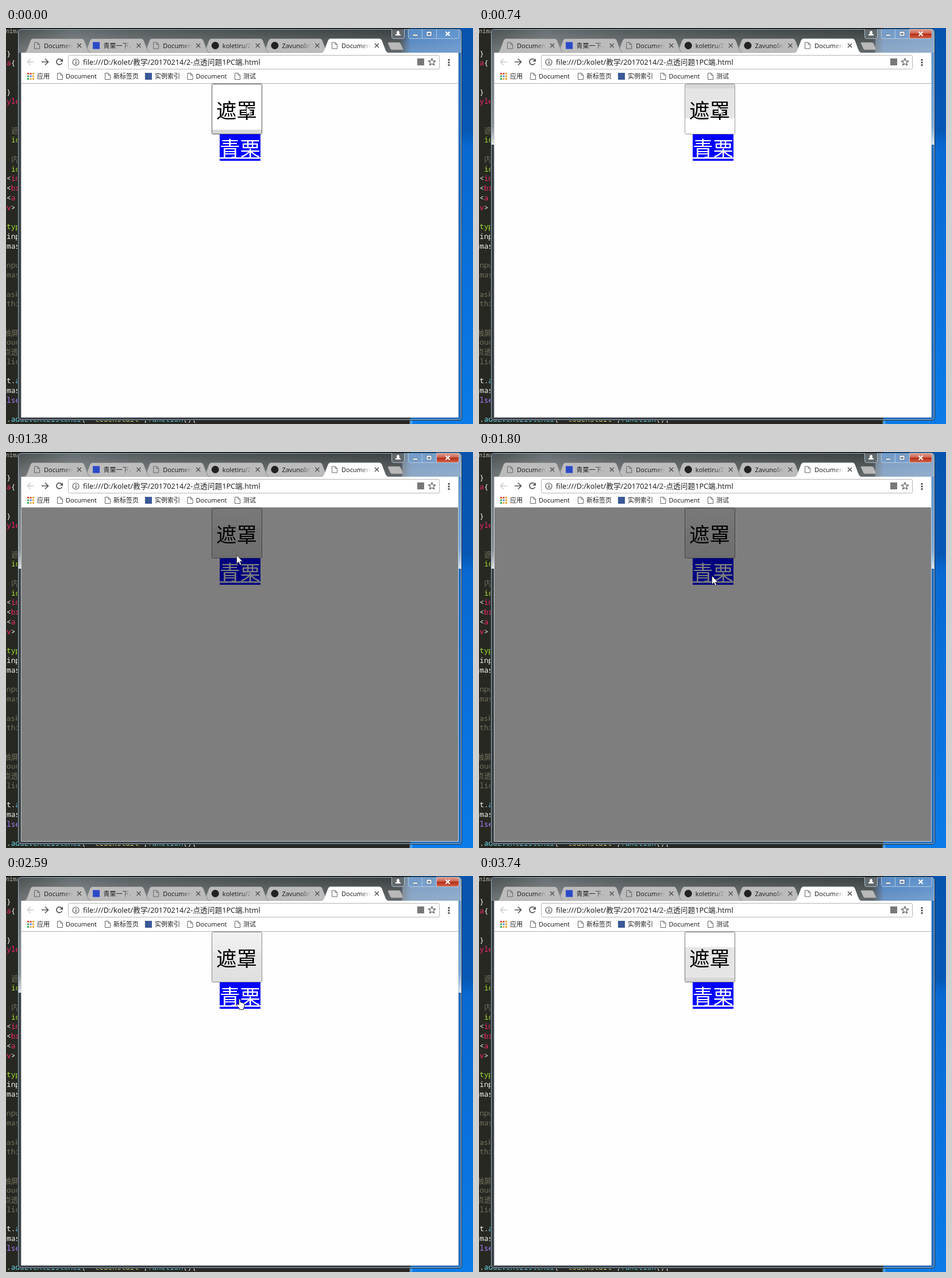
An HTML page for the animation above (3840 ms loop, 813x689 px).

```html
<!DOCTYPE html>
<html lang="zh-CN">
<head>
<meta charset="utf-8">
<style>
  html, body { margin: 0; width: 100%; height: 100%; overflow: hidden; background: #272822; }
  svg { display: block; width: 813px; height: 689px; }
  text { white-space: pre; }
  .ui { font: 11px "Noto Sans", "Noto Sans CJK SC", "Noto Sans CJK", sans-serif; fill: #222; }
  .url { font-size: 12.7px; }
  .big { font: 35.5px "Noto Sans CJK SC", "Noto Sans CJK", sans-serif; }
  .code { font: 12.8px "Noto Sans Mono", "Noto Sans CJK SC", "Noto Sans CJK", monospace; }
  .line { fill: none; stroke: #555; stroke-width: 1.7; }
</style>
</head>
<body>
<svg viewBox="0 0 813 689">
  <defs>
    <linearGradient id="desktop" x2="0" y2="1">
      <stop stop-color="#0754ad"/><stop offset=".26" stop-color="#0758b5"/>
      <stop offset=".3" stop-color="#0869d2"/><stop offset="1" stop-color="#0a7be8"/>
    </linearGradient>
    <linearGradient id="glass">
      <stop stop-color="#3f4547"/><stop offset=".12" stop-color="#5e6568"/><stop offset=".3" stop-color="#4a5053"/>
      <stop offset=".6" stop-color="#3a4042"/><stop offset=".86" stop-color="#2e3336"/>
      <stop offset=".885" stop-color="#3d75b8"/><stop offset="1" stop-color="#4883c5"/>
    </linearGradient>
    <linearGradient id="sheen" x2="0" y2="1">
      <stop stop-color="#fff" stop-opacity=".06"/><stop offset="1" stop-color="#dde4e8" stop-opacity=".3"/>
    </linearGradient>
    <linearGradient id="sideLight" x2="0" y2="1">
      <stop stop-color="#e8f0f6" stop-opacity=".3"/><stop offset=".8" stop-color="#e8f0f6" stop-opacity=".45"/>
      <stop offset="1" stop-color="#fff" stop-opacity=".85"/>
    </linearGradient>
    <linearGradient id="red" x2="0" y2="1">
      <stop stop-color="#e3a396"/><stop offset=".45" stop-color="#cf6350"/>
      <stop offset=".5" stop-color="#b52c16"/><stop offset="1" stop-color="#d2674d"/>
    </linearGradient>
    <linearGradient id="plain" x2="0" y2="1">
      <stop stop-color="#f2f2f2"/><stop offset=".4" stop-color="#ebebeb"/>
      <stop offset=".41" stop-color="#e6e6e6"/><stop offset="1" stop-color="#dfdfdf"/>
    </linearGradient>
    <linearGradient id="fade"><stop stop-color="#bcbcbc" stop-opacity="0"/><stop offset="1" stop-color="#bcbcbc"/></linearGradient>
    <linearGradient id="fadeWhite"><stop stop-color="#fff" stop-opacity="0"/><stop offset="1" stop-color="#fff"/></linearGradient>
    <path id="outline" d="M20.500 8Q20.500 1.500 27 1.500H787Q793.500 1.500 793.500 8V677Q793.500 682.500 788 682.500H26Q20.500 682.500 20.500 677Z"/>
    <path id="page" d="M.5.5H6L9.500 4V11.500H.5ZM6 .5V4H9.500" fill="none" stroke="#666"/>
    <path id="cross" d="M-3.500-3.500 3.500 3.500M3.500-3.500-3.500 3.500" stroke="#555" stroke-width="1.500"/>
  </defs>

  <path d="M0 0H813V689H0Z" fill="#272822"/>
  <path d="M0 0H700V2H0Z" fill="#191b1a"/>
  <path d="M704 0H813V689H704Z" fill="url(#desktop)"/>
  <path d="M703.500 683V689M706.500 683V689" stroke="#9fcdf3"/>
  <g id="editor" class="code"></g>

  <!-- window frame -->
  <use href="#outline" fill="url(#glass)"/>
  <path d="M21 43H27V677H704V682H26Q21 682 21 677Z" fill="#3b4042"/>
  <path d="M788 43H793V682H704V678H788Z" fill="#246dbd"/>
  <path d="M21 3H793V43H21Z" fill="url(#sheen)"/>
  <g id="activeFrame">
    <path d="M690 3H793V43H690Z" fill="#b9c0c6" opacity=".42"/>
    <path d="M21 43H27V203H21ZM788 43H793V203H788Z" fill="url(#sideLight)"/>
  </g>
  <use href="#outline" fill="none" stroke="#1b2a36"/>
  <path d="M21.500 8Q21.500 2.500 27 2.500H787Q792.500 2.500 792.500 8V677Q792.500 681.500 788 681.500H26Q21.500 681.500 21.500 677Z" fill="none" stroke="#bfd2df" stroke-opacity=".75"/>
  <path d="M26.500 43V677.500H787.500V43" fill="none" stroke="#d5dde3" stroke-opacity=".85"/>

  <!-- caption buttons -->
  <g stroke="#c4d5e3" stroke-opacity=".8">
    <path d="M671.500 2V15Q671.500 18.500 675 18.500H690Q693.500 18.500 693.500 15V2" fill="#62696d"/>
    <path d="M700.500 2V15Q700.500 18.500 704 18.500H785Q788.500 18.500 788.500 15V2M724.500 2V18M749.500 2V18" fill="#6d9ed2" fill-opacity=".45"/>
    <path id="closeRed" d="M749.500 2V18.500H785Q788.500 18.500 788.500 15V2Z" fill="url(#red)"/>
  </g>
  <path d="M678 13V11.500L681 9.500A2.400 2.400 0 1 1 684 9.500L687 11.500V13Z" fill="#fff"/>
  <path d="M708 11H717V14H708ZM732 6H741V14H732ZM734.500 9V11.500H738.500V9Z" fill="#fff" fill-rule="evenodd" stroke="#435a70" stroke-width=".7"/>
  <path d="M765.500 6.500 772.500 13.500M772.500 6.500 765.500 13.500" stroke="#fff" stroke-width="2.200"/>

  <g id="tabs" class="ui"></g>
  <path d="M666 25H684Q686 25 687 27L692 38H672Q670 38 669 36L664.500 26Z" fill="#b9b9b9" stroke="#777" stroke-width=".6"/>

  <!-- toolbar -->
  <path d="M27 43H787V97H27Z" fill="#fff"/>
  <rect x="108.500" y="47.500" width="646" height="24" rx="2" fill="#fff" stroke="#b4b4b4"/>
  <path d="M27 96.500H787" stroke="#b0b0b0"/>
  <path class="line" d="M49 59H38M43 53.500 37.500 59 43 64.500" style="stroke:#ccc"/>
  <path class="line" d="M62 59H73M68 53.500 73.500 59 68 64.500"/>
  <path class="line" d="M97 56A5 5 0 1 0 97.500 61"/><path d="M99 53V58.500H93.500Z" fill="#555"/>
  <circle class="line" cx="121.500" cy="59.500" r="5.500" style="stroke-width:1.200"/>
  <path d="M121 56H122.500V57.500H121ZM121 58.500H122.500V63H121Z" fill="#555"/>
  <text class="ui url" x="134" y="63.500">file:///D:/kolet/教学/20170214/2-点透问题1PC端.html</text>
  <rect x="716" y="53" width="12" height="12" fill="#777"/>
  <path class="line" d="M741.500 53 743.300 57.200 747.500 57.500 744.300 60.300 745.300 64.500 741.500 62.200 737.700 64.500 738.700 60.300 735.500 57.500 739.700 57.200Z" style="stroke-width:1.200"/>
  <path d="M769.500 54H772.500V57H769.500ZM769.500 58.500H772.500V61.500H769.500ZM769.500 63H772.500V66H769.500Z" fill="#555"/>
  <g id="bookmarks" class="ui"></g>

  <!-- web page -->
  <path d="M27 97H787V677H27Z" fill="#fefefe"/>
  <path id="face" d="M358.500 97.500H445.500V184.500H358.500Z"/>
  <path id="shade"/>
  <path id="strip" fill="#d7d7d7"/>
  <path id="edge" d="M359.500 97.500H444.500L445.500 98.500V183.500L444.500 184.500H359.500L358.500 183.500V98.500Z" fill="none"/>
  <text class="big" x="401.500" y="156.500" text-anchor="middle">遮罩</text>
  <path d="M372 185H443V231H372Z" fill="#00f"/>
  <text class="big" x="372" y="222.500" fill="#fff">青栗</text>
  <path d="M372 225H443V227.500H372Z" fill="#fff"/>
  <path id="mask" d="M27 97H787V677H27Z" opacity=".5"/>

  <path id="arrow" d="M.5.5V15.500L4 12.200 6.500 17.500 8.700 16.500 6.300 11.300H10.800Z" fill="#fff" stroke="#222" stroke-width=".8"/>
  <path id="hand" d="M5.500 11V2Q6.500 0 8 2V7Q9.500 6 10.500 7.500 12 6.800 13 8.300 15 8 15 10V14Q14.500 16 13.500 17V19.500H6.500V17.500L1.500 12Q1 9.500 3.500 10.200Z" fill="#fff" stroke="#222" stroke-width=".9"/>
</svg>
<script>
const $ = id => document.getElementById(id);
const show = (id, on) => $(id).setAttribute('visibility', on ? 'visible' : 'hidden');
const set = (id, attrs) => { for (const k in attrs) $(id).setAttribute(k, attrs[k]); };

// Editor: row number, x, then text pieces with a colour key each
const ink = { w: '#f8f8f2', p: '#f92672', g: '#a6e22e', c: '#75715e', b: '#66d9ef', v: '#ae81ff', y: '#e6db74' };
const rows = [
  [0, 1, 'w}'], [1, 1, 'pa', 'w{'], [4, 1, 'w}'], [5, 1, 'pyle'], [8, 9, 'c遮'], [9, 9, 'gid'],
  [11, 9, 'c内'], [12, 9, 'gid'], [13, 1, 'w<', 'pin'], [14, 1, 'w<', 'pbr'], [15, 1, 'w<', 'pa'],
  [16, 1, 'pv', 'w>'], [18, 1, 'gtyp'], [19, 1, 'winp'], [20, 1, 'wmas'], [22, 1, 'cnpu'], [23, 1, 'cmas'],
  [25, -7, 'cmask'], [26, 1, 'cthi'], [29, -4, 'c触屏'], [30, 1, 'couc'], [31, -4, 'c点透'], [32, 1, 'clic'],
  [34, 1, 'wt.', 'ba'], [35, 1, 'wmas'], [36, 1, 'vlse'],
  [38, 1, 'w.', 'baddEventListener', 'w( ', "y'touchstart'", 'w,', 'bfunction', 'w(){']
];
const escape = s => s.replace('<', '&lt;');
$('editor').innerHTML = '<text x="0" y="9" font-size="10" fill="#bbb">nimati</text>' + rows.map(([row, x, ...parts]) =>
  `<text x="${x}" y="${48.500 + row * 16.760}">` +
  parts.map(p => `<tspan fill="${ink[p[0]]}">${escape(p.slice(1))}</tspan>`).join('') + '</text>').join('');

const icon = (kind, x, y) => ({
  page: `<use href="#page" x="${x}" y="${y}"/>`,
  square: `<rect x="${x}" y="${y}" width="12" height="12" fill="#2a49c8"/>`,
  navy: `<rect x="${x}" y="${y}" width="12" height="12" fill="#3b5998"/>`,
  disc: `<circle cx="${x + 6}" cy="${y + 6}" r="6.500" fill="#222"/>`
})[kind];

const tabs = [['page', 'Documen'], ['square', '青栗一下，'], ['page', 'Documen'],
  ['disc', 'koletiru/Z'], ['disc', 'ZavunoIn'], ['page', 'Documen']];
const drawTab = ([kind, label], i) => {
  const active = i === 5, dx = i * 103.600;
  const fill = active ? '#fff' : '#bcbcbc';
  const iconX = kind === 'page' ? 49 : 47.500;
  return `<g transform="translate(${dx})">
    <path d="M32 43Q35 42 36.500 38L42.500 22Q44 18.500 47 18.500H132Q135 18.500 136.500 22L142.500 38Q144 42 147 43Z"
      fill="${fill}" stroke="#777" stroke-width="${active ? 0 : .7}"/>
    ${icon(kind, iconX, 24.500)}
    <text x="66" y="34.500">${label}</text>
    <rect x="99" y="22" width="18" height="19" fill="url(#${active ? 'fadeWhite' : 'fade'})"/>
    <rect x="117" y="22" width="18" height="19" fill="${fill}"/>
    <use href="#cross" x="127.500" y="30.500"/></g>`;
};
// Each background tab overlaps the one to its right; the active tab lies on top
const drawn = tabs.map(drawTab), front = drawn.pop();
$('tabs').innerHTML = drawn.reverse().join('') + front;

const bookmarks = [[54, '应用'], [104, 'Document', 'page'], [187, '新标签页', 'page'],
  [259, '实例索引', 'navy'], [330.500, 'Document', 'page'], [413, '测试', 'page']];
const dotColors = ['#e5453a', '#e5453a', '#f2a73b', '#3aa757', '#4285f4', '#f2a73b', '#3aa757', '#f2a73b', '#f2a73b'];
$('bookmarks').innerHTML = bookmarks.map(([x, label, kind]) =>
  `<text x="${x}" y="88">${label}</text>` + (kind ? icon(kind, x - (kind === 'page' ? 15 : 17), 78) : '')).join('') +
  dotColors.map((c, i) => `<rect x="${37 + i % 3 * 4.500}" y="${78 + (i / 3 | 0) * 4.500}" width="3" height="3" fill="${c}"/>`).join('');

// Pointer: start time, x, y, shape
const pointer = [
  [0, 418, 136, 'arrow'], [460, 416, 136, 'arrow'], [1230, 410, 152, 'arrow'], [1380, 401, 179, 'arrow'],
  [1530, 401, 204, 'arrow'], [1680, 404, 213, 'arrow'], [1800, 405, 215, 'arrow'], [2200, 405, 214, 'arrow'],
  [2320, 404, 214, 'arrow'], [2440, 404, 213, 'arrow'], [2590, 400, 213, 'hand'], [2710, 448, 246, 'arrow'],
  [2830, 610, 384, 'arrow'], [2950, 742, 512, 'arrow'], [3100, 760, 602, 'arrow'], [3220, 760, 672, 'arrow'],
  [3340, 0, 0, 'none']
];

// Button look: start time, face, shaded part, strip, border
const hot = 'M359 177H445V184H359Z';
const looks = [
  [0, '#fff', '', hot, '#555'],
  [740, '#fff', 'M359 98H445V157H359Z', 'M359 98H445V105H359Z', '#999'],
  [860, 'url(#plain)', '', '', '#888'],
  [3740, '#fff', 'M359 124H445V184H359Z', hot, '#777']
];
const latest = (list, t) => list.findLast(item => item[0] <= t);

function draw(t) {
  const active = t >= 740 && t < 3740;
  show('activeFrame', active);
  show('closeRed', active);
  show('mask', t >= 860 && t < 2590);

  const [, face, shade, strip, edge] = latest(looks, t);
  set('face', { fill: face });
  set('shade', { d: shade, fill: '#e5e5e5' });
  set('strip', { d: strip });
  set('edge', { stroke: edge });

  const [, x, y, shape] = latest(pointer, t);
  for (const id of ['arrow', 'hand']) {
    show(id, id === shape);
    set(id, { transform: `translate(${x} ${y})` });
  }
}

const start = performance.now();
function tick() {
  draw((performance.now() - start) % 3840);
  requestAnimationFrame(tick);
}
tick();
</script>
</body>
</html>
```
